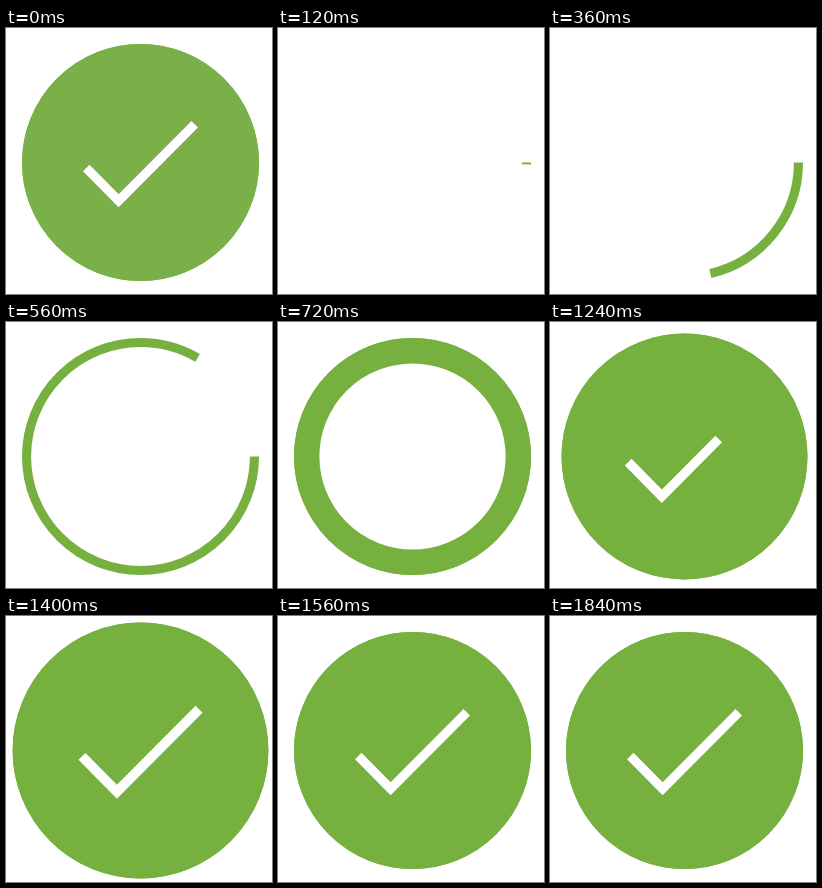
Animation of 266 by 266 pixels, one loop 1880 ms. Source, as an HTML page:

```html
<!DOCTYPE html>
<html lang="en">
<head>
<meta charset="utf-8">
<title>Check mark</title>
<style>
  html, body { margin: 0; width: 100%; height: 100%; overflow: hidden; background: #fff; }
  svg { display: block; width: 100%; height: 100%; fill: none; }
</style>
</head>
<body>
<svg viewBox="0 0 266 266">
  <g id="badge">
    <circle id="disc" cx="26" cy="26"/>
    <circle id="ring" cx="26" cy="26" r="25" stroke-width="2"/>
    <path id="check" d="M14.1 27.2l7.1 7.2 16.7-16.8" stroke="#fff" stroke-width="2"/>
  </g>
</svg>
<script>
const LOOP = 1880, STEP = 40, START = 80, UNIT = 4.558;
const [badge, disc, ring, check] =
  ['badge', 'disc', 'ring', 'check'].map(id => document.getElementById(id));

const set = (el, attrs) => {
  for (const name in attrs) el.setAttribute(name, attrs[name]);
};
const progress = (t, from, length) => Math.min(1, Math.max(0, (t - from) / length));

// cubic-bezier(x1, 0, x2, 1), solved by bisection
const bezier = (x1, x2) => x => {
  let lo = 0, hi = 1;
  for (let i = 0; i < 24; i++) {
    const s = (lo + hi) / 2, r = 1 - s;
    if (3 * r * r * s * x1 + 3 * r * s * s * x2 + s ** 3 < x) lo = s;
    else hi = s;
  }
  return lo * lo * (3 - 2 * lo);
};
const easeDraw = bezier(.65, .45), easeInOut = bezier(.42, .58);

// Shows the first `length` units of a stroke
function reveal(el, length) {
  set(el, {
    'stroke-dasharray': `${length} 200`,
    visibility: length > .01 ? 'visible' : 'hidden'
  });
}

function draw(now) {
  let t = Math.floor(now % LOOP / STEP) * STEP;
  const color = t < START ? '#7aaf4a' : '#76b03f';
  if (t < START) t = LOOP; // the loop opens on the finished badge

  reveal(ring, 166 * easeDraw(progress(t, START, 720)));
  reveal(check, 48 * easeDraw(progress(t, START + 957, 360)));

  // Fill grows inward from the rim
  const inset = Math.min(26, 27.86 * easeInOut(progress(t, 571, 481)));
  set(disc, { r: 26 - inset / 2, 'stroke-width': inset, stroke: color });
  set(ring, { stroke: color });

  const pulse = 1 - Math.abs(2 * progress(t, START + 1083, 360) - 1);
  const scale = UNIT * (1 + .1 * easeInOut(pulse));
  set(badge, { transform: `translate(134.5 134.5) scale(${scale}) translate(-26 -26)` });
}

function tick() {
  draw(performance.now());
  requestAnimationFrame(tick);
}
tick();
</script>
</body>
</html>
```
